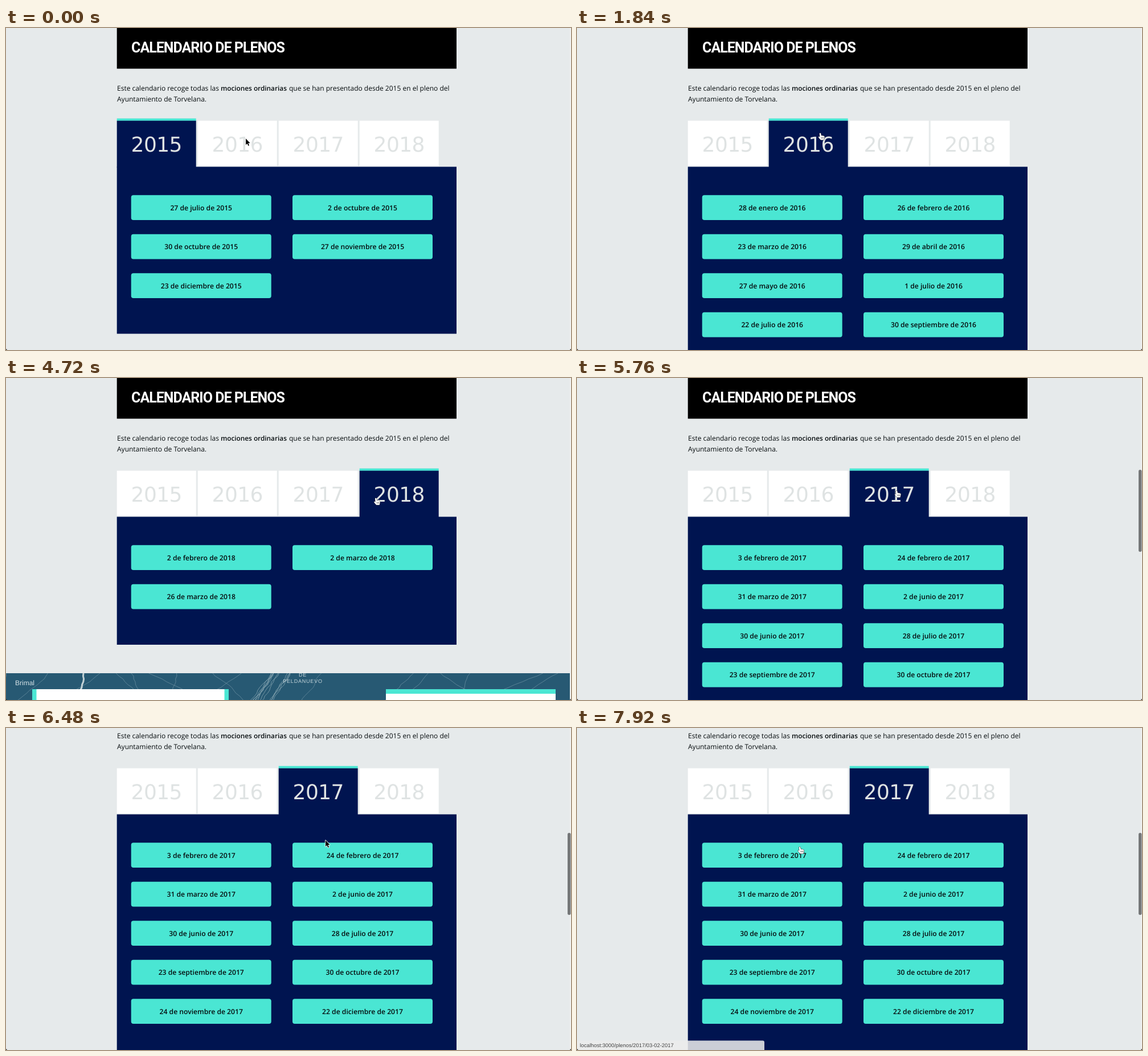
An HTML page with a canvas for the animation above (8 s loop, 992 px wide and 565 px high).

```html
<!DOCTYPE html>
<html lang="es">
<head>
<meta charset="utf-8">
<title>Calendario de plenos</title>
<style>
html, body { margin: 0; width: 100%; height: 100%; overflow: hidden; background: #e6eaeb; }
canvas { display: block; width: 992px; height: 565px; }
h1 {
  position: absolute; left: 220px; top: 0; margin: 0; color: #fff; white-space: nowrap;
  font-weight: 600; line-height: 70px; letter-spacing: -.04em;
  font-stretch: extra-condensed; font-variation-settings: "wdth" 62.5;
}
</style>
</head>
<body>
<canvas id="stage" width="992" height="565"></canvas>
<h1 id="title">CALENDARIO DE PLENOS</h1>
<script>
const W = 992, H = 565, LOOP = 8000;
const ctx = document.getElementById('stage').getContext('2d');
const title = document.getElementById('title');
const NAVY = '#001450', TEAL = '#4ae6d3', INK = '#060c0e', PAGE = '#e6eaeb';
const BODY = '"Open Sans", "Noto Sans", sans-serif';
const LABEL = '"Liberation Sans", Arial, sans-serif';

const LEFT = 194.7, PITCH = 142, TAB_W = 139, TAB_TOP = 163, PANEL_TOP = 243.5;
const ROW = 68.5, BUTTON_W = 246, BUTTON_H = 43.7;

const DATES = {
  2015: ['27 de julio', '2 de octubre', '30 de octubre', '27 de noviembre', '23 de diciembre'],
  2016: ['28 de enero', '26 de febrero', '23 de marzo', '29 de abril', '27 de mayo',
    '1 de julio', '22 de julio', '30 de septiembre'],
  2017: ['3 de febrero', '24 de febrero', '31 de marzo', '2 de junio', '30 de junio',
    '28 de julio', '23 de septiembre', '30 de octubre', '24 de noviembre', '22 de diciembre'],
  2018: ['2 de febrero', '2 de marzo', '26 de marzo']
};
const YEARS = Object.keys(DATES);

// The pointer reaches each stop after TRAVEL ms and clicks PAUSE ms later
const TRAVEL = 400, PAUSE = 200, HOVER_LAG = 120;
const REST = { x: 421, y: 194, year: 2015 };
const STOPS = [
  { at: 400, x: 427, y: 184, year: 2016 },
  { at: 3400, x: 534, y: 202, year: 2017 },
  { at: 4120, x: 674, y: 214, year: 2018 },
  { at: 5000, x: 561, y: 197, year: 2017 },
  { at: 7720, x: 391, y: 208, year: 2017 }
];
const SCROLL = { from: 5750, to: 6390, by: 92 };

function ramp(t, a, b) {
  const k = Math.min(1, Math.max(0, (t - a) / (b - a)));
  return k * k * (3 - 2 * k);
}

function pointerAt(t) {
  let { x, y } = REST;
  for (const stop of STOPS) {
    const k = ramp(t, stop.at - TRAVEL, stop.at);
    x += (stop.x - x) * k;
    y += (stop.y - y) * k;
  }
  return [x, y];
}

const yearAt = t => STOPS.reduce((year, s) => t >= s.at + PAUSE ? s.year : year, REST.year);
const tabX = i => LEFT + i * PITCH;
const buttonPos = i => [i % 2 ? 503 : 219.7, 293.3 + (i >> 1) * ROW];
const inside = (px, py, x, y, w, h) => px >= x && px < x + w && py >= y && py < y + h;

function rect(x, y, w, h, color) {
  ctx.fillStyle = color;
  ctx.fillRect(x, y, w, h);
}

function round(x, y, w, h, r, color) {
  ctx.fillStyle = color;
  ctx.beginPath();
  ctx.roundRect(x, y, w, h, r);
  ctx.fill();
}

function text(str, x, y, font, color, align = 'left', spacing = 0) {
  ctx.font = font;
  ctx.letterSpacing = spacing + 'px';
  ctx.textAlign = align;
  ctx.fillStyle = color;
  ctx.fillText(str, x, y);
}

// Narrowest installed face, at the largest size that fits the header
function setTitleFont() {
  const fits = ['"Noto Sans"', '"Open Sans"', 'Roboto'].map(face => {
    title.style.font = `600 100px/70px ${face}, sans-serif`;
    title.style.fontStretch = 'extra-condensed';
    title.style.fontVariationSettings = '"wdth" 62.5';
    return { face, size: Math.min(38, 26900 / title.offsetWidth) };
  });
  const best = fits.reduce((a, b) => b.size > a.size ? b : a);
  title.style.fontFamily = best.face + ', sans-serif';
  title.style.fontSize = best.size + 'px';
}

function intro() {
  rect(LEFT, 0, 596.3, 71.4, '#000');
  const regular = '450 12px ' + BODY;
  text('Este calendario recoge todas las', 195, 110.3, regular, INK);
  text('mociones ordinarias', 377, 110.3, '600 11.8px ' + BODY, INK);
  text('que se han presentado desde 2015 en el pleno del', 497, 110.3, regular, INK);
  text('Ayuntamiento de Torvelana.', 195, 129.1, regular, INK);
}

function tabs(active, hover) {
  YEARS.forEach((year, i) => {
    const x = tabX(i), on = year == active;
    if (on) rect(x, TAB_TOP - 4.3, TAB_W, 4.3, TEAL);
    rect(x, TAB_TOP - 0.3, TAB_W, on ? 82 : 79.5, on ? NAVY : '#fff');
    text(year, x + 69.5, 217.4, '36px "DejaVu Sans", sans-serif',
      !on && i === hover ? INK : '#dfe3e3', 'center', -0.6);
  });
}

function panel(year) {
  const list = DATES[year];
  const height = 87.5 + Math.ceil(list.length / 2) * ROW;
  rect(LEFT, PANEL_TOP, 596.3, height, NAVY);
  list.forEach((day, i) => {
    const [x, y] = buttonPos(i);
    round(x, y, BUTTON_W, BUTTON_H, 4, TEAL);
    text(`${day} de ${year}`, x + BUTTON_W / 2, y + 26.4, '600 12.15px ' + BODY, INK, 'center');
  });
  return PANEL_TOP + height;
}

function seeded(seed) {
  return () => (seed = seed * 16807 % 2147483647) / 2147483647;
}

// A wandering line from the top of the map downwards
function road(x, slope, width, color, rand) {
  ctx.strokeStyle = color;
  ctx.lineWidth = width;
  ctx.beginPath();
  for (let y = 0; y <= 50; y += 5) {
    ctx.lineTo(x, y);
    x += slope * 5 + (rand() - 0.5) * 5;
  }
  ctx.stroke();
}

function map(top) {
  if (top >= H) return;
  const rand = seeded(41);
  ctx.save();
  ctx.beginPath();
  ctx.rect(0, top, 990, H - top);
  ctx.clip();
  ctx.translate(0, top);
  rect(0, 0, 990, 50, '#275973');
  for (let i = 0; i < 16; i++) road(rand() * 990, (rand() - 0.5) * 5, 0.7, '#6f93a4', rand);
  for (let i = 0; i < 12; i++) road(455 + rand() * 45, -0.7, 0.8, '#86a5b2', rand);
  road(136, -0.1, 3, '#c3d2d6', rand);
  text('Brimal', 16, 20.5, '12px ' + LABEL, '#d3e0e5');
  ['DE', 'PELDANUEVO'].forEach((word, i) =>
    text(word, 521, 6 + i * 10.5, '9px ' + LABEL, '#c6d6dc', 'center', 0.8));
  rect(46, 28, 345, 50, TEAL);
  rect(53.5, 28, 330, 50, '#fff');
  rect(667, 28, 298, 50, '#fff');
  rect(667, 28, 298, 8, TEAL);
  ctx.restore();
}

const ARROW = new Path2D('M0 0V11L2.6 8.7L4.3 12.7L6 12L4.3 8.1L7.6 8Z');
const HAND = new Path2D('M-1.3 1Q0 -.5 1.2 1L2 5Q3.4 4 4 5.2Q5.4 4.3 5.9 5.7Q7.5 5.2 7.6 7' +
  'L7 10.3L6.4 12.5H1L-1.8 9.4L-3.2 7.2Q-2.5 5.6 -.6 7.2Z');
const FINGERS = new Path2D('M2 7.5V10M3.8 7.5V10M5.5 7.5V10');

function cursor(x, y, hand) {
  const shape = hand ? HAND : ARROW;
  ctx.save();
  ctx.translate(x, y);
  ctx.lineJoin = 'round';
  ctx.lineWidth = hand ? 1 : 1.6;
  ctx.strokeStyle = hand ? '#111' : '#fff';
  ctx.fillStyle = hand ? '#fff' : '#000';
  ctx.stroke(shape);
  ctx.fill(shape);
  if (hand) {
    ctx.lineWidth = 0.6;
    ctx.stroke(FINGERS);
  }
  ctx.restore();
}

function status() {
  round(0, 548.5, 329, 17, [0, 3, 0, 0], 'rgba(237,237,237,.86)');
  text('localhost:3000/plenos/2017/03-02-2017', 5, 560, '9.4px ' + LABEL, '#444');
}

function draw(t) {
  const year = yearAt(t);
  const scroll = Math.round(SCROLL.by * ramp(t, SCROLL.from, SCROLL.to));
  const [x, y] = pointerAt(t);

  // Hover is not refreshed while the page is scrolling
  const pageY = t < SCROLL.to ? y : y + scroll;
  const live = t >= HOVER_LAG;
  const tab = YEARS.findIndex((_, i) =>
    live && inside(x, pageY, tabX(i), TAB_TOP, TAB_W, PANEL_TOP - TAB_TOP));
  const onButton = DATES[year].some((_, i) =>
    inside(x, pageY, ...buttonPos(i), BUTTON_W, BUTTON_H));

  rect(0, 0, W, H, PAGE);
  ctx.save();
  ctx.translate(0, -scroll);
  title.style.transform = `translateY(${-scroll}px)`;
  intro();
  const bottom = panel(year);
  tabs(year, tab);
  map(bottom + 50);
  ctx.restore();

  rect(990, 0, 2, H, '#f0f2f2');
  if (t >= SCROLL.from) round(986, 161 + scroll / 4, 5.5, 144, 2.75, '#757778');
  if (onButton) status();
  for (const cx of [0, 990.5]) rect(cx, 563.5, 1.5, 1.5, '#222');
  cursor(x, y, tab >= 0 || onButton);
}

ctx.textRendering = 'geometricPrecision';
setTitleFont();
const start = performance.now();
function frame() {
  draw((performance.now() - start) % LOOP);
  requestAnimationFrame(frame);
}
frame();
</script>
</body>
</html>
```
